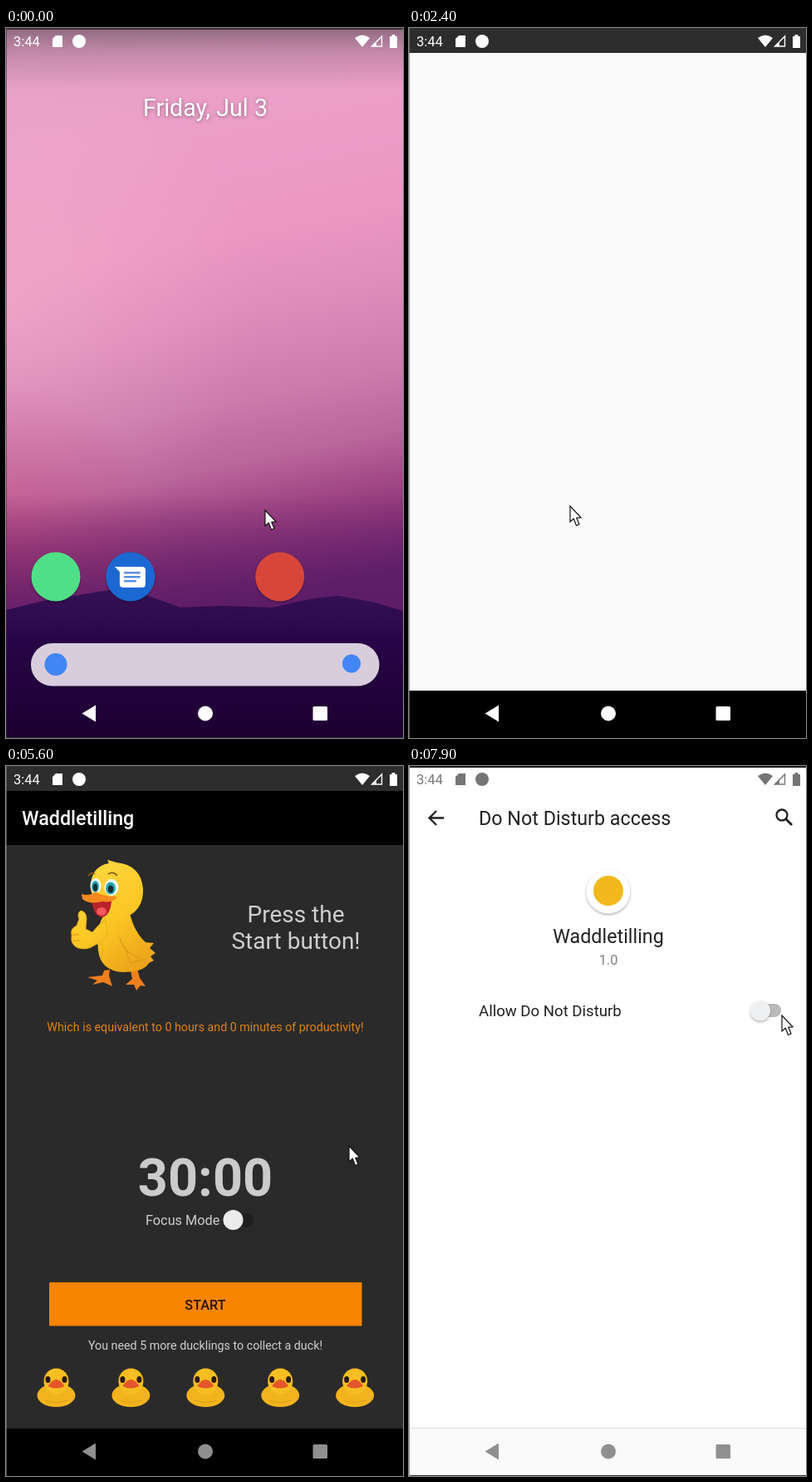
These frames come from a looping animation (478x854 px, 8 s). An HTML page with a canvas:

```html
<!DOCTYPE html>
<html lang="en">
<head>
<meta charset="utf-8">
<style>
html, body { margin: 0; width: 478px; height: 854px; overflow: hidden; background: #000; }
canvas { display: block; }
</style>
</head>
<body>
<canvas id="stage" width="478" height="854"></canvas>
<script>
const c = document.getElementById('stage').getContext('2d');
const W = 478, H = 854, LOOP = 8000, STEP = 100;
const APP = 'Waddletilling';

const clamp = v => Math.max(0, Math.min(1, v));
const lerp = (a, b, p) => a + (b - a) * p;
const smooth = p => p * p * (3 - 2 * p);
const ramp = (t, from, to) => smooth(clamp((t - from) / (to - from)));

function rect(x, y, w, h, color, r = 0) {
  c.fillStyle = color;
  c.beginPath();
  c.roundRect(x, y, w, h, r);
  c.fill();
}
function oval(x, y, rx, ry, color) {
  c.fillStyle = color;
  c.beginPath();
  c.ellipse(x, y, rx, ry, 0, 0, 7);
  c.fill();
}
const disc = (x, y, r, color) => oval(x, y, r, r, color);
function shape(d, fill, stroke, width = 1) {
  const path = new Path2D(d);
  if (fill) { c.fillStyle = fill; c.fill(path); }
  if (stroke) { c.strokeStyle = stroke; c.lineWidth = width; c.stroke(path); }
}
function text(s, x, y, size, color, align = 'left', weight = 400) {
  c.font = `${weight} ${size}px Roboto, sans-serif`;
  c.textAlign = align;
  c.fillStyle = color;
  c.fillText(s, x, y);
}
function withStops(g, stops) {
  stops.forEach(([at, color]) => g.addColorStop(at, color));
  return g;
}
const gradient = (x0, y0, x1, y1, ...stops) => withStops(c.createLinearGradient(x0, y0, x1, y1), stops);
const glow = (x, y, r, ...stops) => withStops(c.createRadialGradient(x, y, 0, x, y, r), stops);
function group(draw, alpha = 1, x = 0, y = 0) {
  if (alpha <= 0) return;
  c.save();
  c.globalAlpha *= alpha;
  c.translate(x, y);
  draw();
  c.restore();
}
function shadowed(draw, blur = 3, dy = 1.5, color = 'rgba(0,0,0,.3)') {
  c.save();
  c.shadowColor = color;
  c.shadowBlur = blur;
  c.shadowOffsetY = dy;
  draw();
  c.restore();
}

// System bars
function statusBar(color) {
  text('3:44', 9, 22, 16.5, color);
  shape('M60 9H68V23H56V13Z', color);
  disc(88, 16, 8, color);
  shape('M429 23L420 12Q429 5 438 12Z', color);
  shape('M452.5 10V22H440.5Z', null, color, 1.4);
  shape('M446 16.5V22H440.5Z', color);
  shape('M464.5 8H468.5V10H471V24H462V10H464.5Z', color);
}
function navBar(color) {
  shape('M108 814.5V834.5L91.5 824.5Z', color);
  disc(240, 824.5, 9, color);
  rect(369.5, 816, 17.5, 17, color, 1.5);
}

// Launcher icons, drawn around (0, 0)
const plate = color => shadowed(() => disc(0, 0, 29.5, color));
const plain = color => () => plate(color);
const badge = color => () => { plate('#fff'); disc(0, 0, 18, color); };
const green = plain('#4fe087');

const icons = {
  calendar() {
    plate('#fff');
    rect(-17, -19, 34, 10, '#a9b4c8', 2);
    rect(-19, -12, 38, 29, '#3f6fd0', 2);
    text('3', 0, 10, 23, '#fff', 'center');
  },
  camera() {
    plate('#4c7fdc');
    shape('M-8-17H8L11-12H17Q19-12 19-10V12Q19 14 17 14H-17Q-19 14-19 12V-10Q-19-12-17-12H-11Z', '#fff');
    disc(0, 1, 10, '#c9d6ee');
    disc(0, 1, 7, '#4080e8');
  },
  clock() {
    plate('#c8ccd6');
    disc(0, 0, 25, '#4c80dc');
    shape('M-26 2L0-1L16 6', null, '#fff', 2.5);
    disc(0, 0, 2.5, '#fff');
  },
  contacts() {
    plate('#fff');
    rect(-16, -15, 32, 31, '#0f83c4', 2);
    rect(-16, -11, 32, 22, '#20a9dd');
    disc(0, -4, 4.5, '#fff');
    shape('M-9 8Q-8 2 0 2Q8 2 9 8Z', '#fff');
  },
  files() {
    plate('#4c80dc');
    shape('M-15-15H-4L0-11H13Q15-11 15-9V12Q15 14 13 14H-13Q-15 14-15 12Z', '#e3eafb');
    shape('M-15-7H15V12Q15 14 13 14H-13Q-15 14-15 12Z', '#fff');
  },
  messages() {
    plate('#1c68d2');
    shape('M-19-12H14Q18-12 18-8V9Q18 13 14 13H-9Q-13 13-13 9V-6Z', '#fff');
    for (const y of [-5, 0, 5]) rect(-8, y - 1, y > 4 ? 15 : 20, 2.5, '#5a8fe0', 1);
  },
  phone() {
    plate('#fff');
    shape('M-15-16H-8L-5-7L-9-3Q-5 5 3 9L7 5L16 8V15Q14 17 10 16Q-12 11-16-12Z', '#149be0');
  },
  settings() {
    plate('#1f68d2');
    for (let i = 0; i < 8; i++) {
      rect(-5, -21, 10, 12, '#fff', 2);
      c.rotate(Math.PI / 4);
    }
    disc(0, 0, 16.5, '#fff');
    disc(0, 0, 8, '#1f68d2');
    disc(0, 0, 5, '#fff');
  }
};
const browser = plain('#d8463a');
const apps = [
  ['Basic UI', green], ['Calendar', icons.calendar], ['Camera', icons.camera], ['Tarvik', browser], ['Clock', icons.clock],
  ['Coba', green], ['Contacts', icons.contacts], ['Stovo', badge('#2ba25b')], ['Files', icons.files], ['FirstAppli…', green],
  ['Ombix', badge('#d5483f')], ['Zemlio', badge('#4285f4')], ['Hello World', green], ['Just Java', green], ['Trel', plain('#3fa65a')],
  ['Messages', icons.messages], ['Phone', icons.phone], ['Photos', badge('#f0b52c')], ['Vask Film…', badge('#b5203f')], ['Vask Tunes', badge('#f07a24')],
  ['PracticeS…', green], ['Waddletill…', badge('#f2b81c')], ['Settings', icons.settings], ['Tutorial1', green], ['Tutorial2', green],
  ['Clipono', badge('#e3131c')]
];
const column = i => 60 + 89.9 * i;

// Home screen and app drawer
function wallpaper() {
  rect(0, 0, W, H, gradient(239, 0, 374, 673, [0, '#e6a0c6'], [.15, '#ec9fc8'], [.36, '#eb98c3'],
    [.5, '#df8dbb'], [.65, '#cb7bac'], [.76, '#b9669c'], [.84, '#a14885'], [.91, '#8a3479'], [1, '#66246f']));
  rect(0, 0, W, H, glow(0, 330, 300, [0, 'rgba(255,195,215,.3)'], [1, 'rgba(255,195,215,0)']));
  rect(0, 0, W, H, glow(0, 625, 200, [0, 'rgba(200,60,115,.4)'], [1, 'rgba(200,60,115,0)']));
  rect(0, 560, W, 160, gradient(0, 560, 0, 700, [0, 'rgba(90,25,100,0)'], [1, 'rgba(90,25,100,.75)']));
  rect(0, 0, W, 75, gradient(0, 0, 0, 75, [0, 'rgba(70,60,70,.55)'], [.4, 'rgba(90,70,85,.25)'], [1, 'rgba(90,70,85,0)']));
  shape('M0 700L45 689L100 680L130 675L160 679L210 697L260 695L320 697L370 686L400 683L440 690L478 701V854H0Z',
    gradient(0, 680, 0, H, [0, '#351055'], [.35, '#280447'], [1, '#1c0030']));
}
function searchBar(y, p) {
  const tint = [lerp(216, 252, p), lerp(205, 249, p), lerp(221, 251, p)];
  shadowed(() => rect(30, y - 25.5, 419.5, 51.5, `rgb(${tint})`, 25.7), 4, 1.5, 'rgba(0,0,0,.18)');
  disc(60, y, 13.5, '#4285f4');
  disc(416, y - 1, 11, '#4285f4');
}
function launcher(t) {
  const p = ramp(t, 500, 1250), shift = 675 * (1 - p);
  const settled = t >= 1500;
  wallpaper();
  group(() => shadowed(() => text('Friday, Jul 3', 240, 106, 28.6, '#fff', 'center'), 4, 1, 'rgba(0,0,0,.4)'), 1 - 2 * p);
  group(() => rect(0, 2 + shift, W, H, gradient(0, 0, 0, H, [0, '#fefafd'], [.35, '#fbf4f9'], [.75, '#f3eef4'], [.85, '#ebeaee'], [1, '#ececf0']), 14),
    clamp(p * 1.6));
  for (const [i, icon] of [[0, green], [1, icons.messages], [3, browser]])
    group(icon, 1 - 3 * p, column(i), 660 - 675 * p);
  group(() => apps.forEach(([name, icon], i) => {
    const x = column(i % 5), y = 172 + 112 * Math.floor(i / 5);
    group(icon, 1, x, y);
    text(name, x, y + 56, 14.2, '#77747a', 'center');
  }), clamp((p - .3) * 2), 0, shift);
  searchBar(90.5 + shift, p);
  group(() => rect(0, 812, W, 42, '#f1f0f3'), clamp(p * 2 - 1));
  statusBar(settled ? '#757575' : '#fff');
  navBar(settled ? '#909090' : '#fff');
  rect(0, 0, W, 2, '#3d3039');
  rect(0, 853, W, 1, '#2a2430');
  rect(0, 0, 1, H, 'rgba(60,50,60,.6)');
}

// Focus timer app
function mascot() {
  const skin = gradient(85, 115, 180, 250, [0, '#fedb45'], [.5, '#fcc724'], [1, '#e79a18']);
  shape('M118 246L116 252L98 254L110 258L104 263L117 260L128 265L124 252L125 245ZM150 246L152 256L144 263L154 263L157 270L162 264L168 265L161 255L158 244Z', '#ee7f1e');
  shape('M119 178Q108 192 111 222Q114 246 140 248Q166 248 172 237L178 234L174 229L180 225L173 219L178 213L168 212Q159 204 153 190L148 175Z', skin);
  shape('M120 184Q112 190 104 200L96 196L97 184Q97 175 90 174Q85 177 88 184L85 192Q77 195 79 204Q77 215 87 219Q98 222 106 216Q116 212 122 202Z', skin, '#e2a51c', .7);
  shape('M80 203H88M80 210H89', null, '#d99618');
  shape('M102 148Q101 121 124 117L122 113L133 116Q162 119 165 147Q166 172 146 181Q118 187 108 171Z', skin);
  shape('M137 206Q140 224 160 230M142 216L150 237L168 232', null, '#dc9d19', 1.5);
  oval(108, 144, 6.5, 9, '#fff');
  oval(127, 146, 8.5, 10, '#fff');
  oval(107.5, 145, 4.5, 7, '#25a5ad');
  oval(126, 147, 6, 7.5, '#25a5ad');
  oval(107.5, 146, 2.5, 4.5, '#102a30');
  oval(126, 148, 3.2, 4.5, '#102a30');
  shape('M99 132Q103 127 107 130M123 130Q129 126 134 132', null, '#8a5a12', 1.6);
  shape('M103 163L127 162Q126 179 116 182Q106 181 103 163Z', '#b8222c');
  oval(115, 175, 6, 5, '#f0585a');
  shape('M91 154Q101 157 108 151Q116 157 134 157Q130 165 116 163Q100 167 92 160Z', '#f58b1f');
}
function duckling() {
  oval(0, 9, 23, 14, '#f2b41d');
  oval(0, -8, 15, 15.5, '#f7be22');
  oval(-10, -10, 3, 4, '#2b1a10');
  oval(10, -10, 3, 4, '#2b1a10');
  shape('M-10-2Q-5-10 0-10Q5-10 10-2Q0 3-10-2Z', '#e4572a');
  shape('M-13 15Q0 20 13 15', null, '#dc9d19');
}
function timerApp(t) {
  const dim = ramp(t, 2900, 3100) * (1 - ramp(t, 5400, 5600));
  rect(0, 30, W, 767, '#2a2a2a');
  rect(0, 30, W, 65, '#000');
  text(APP, 19, 71, 23.3, '#fff', 'left', 500);
  mascot();
  text('Press the', 349, 188, 28, '#cfcfcf', 'center');
  text('Start button!', 349, 220, 28, '#cfcfcf', 'center');
  text('Which is equivalent to 0 hours and 0 minutes of productivity!', 240, 319, 14.28, '#e08217', 'center');
  text('30:00', 240, 517, 63, '#cbcbcb', 'center', 700);
  text('Focus Mode', 168, 552, 16.3, '#cfcfcf');
  rect(262, 538, 36, 16, '#202020', 8);
  disc(273.5, 546, 12, '#ececec');
  rect(52, 621, 376.5, 52.5, '#f88400', 1);
  text('START', 240, 653.5, 16.3, '#241300', 'center', 500);
  text('You need 5 more ducklings to collect a duck!', 240, 702, 14.28, '#cfcfcf', 'center');
  for (let i = 0; i < 5; i++) group(duckling, 1, column(i) + .5, 748);
  rect(0, 30, W, 767, `rgba(0,0,0,${.36 * dim})`);
  group(() => {
    shadowed(() => rect(31, 346, 418.5, 134, '#eeeef0', 2), 8, 3, 'rgba(0,0,0,.4)');
    text(`You are required to allow ${APP} app`, 59, 387, 18.6, '#222');
    text('to access the do not disturb settings.', 59, 409, 18.6, '#222');
    text('OK', 398, 453.5, 16.3, '#e08a1e', 'center', 500);
  }, dim);
}
function appWindow(t) {
  const open = ramp(t, 2000, 2300);
  c.save();
  c.globalAlpha = clamp(open * 3);
  c.beginPath();
  c.roundRect(lerp(121, 0, open), lerp(591, 0, open), lerp(58, W, open), lerp(58, H, open), 29 * (1 - open));
  c.clip();
  rect(0, 0, W, H, '#fafafa');
  rect(0, 0, W, 30, '#2d2d2d');
  statusBar('#fff');
  if (t >= 2800) timerApp(t);
  rect(0, 797, W, 57, '#000');
  navBar(t < 3000 ? '#fff' : '#8f8f8f');
  rect(0, 0, 1, H, 'rgba(130,130,130,.6)');
  c.restore();
}

// Settings
function settingsPage(t) {
  const listed = t >= 6500, detail = ramp(t, 7250, 7600);
  rect(0, 0, W, H, '#fff');
  statusBar('#757575');
  text('Do Not Disturb access', listed ? 84 : 19, 71, 23.3, '#212121');
  if (listed) {
    shape('M42 62.5H25M33 54L24.5 62.5L33 71', null, '#212121', 2.3);
    c.beginPath();
    c.arc(449, 59, 6.5, 0, 7);
    c.stroke();
    shape('M453.5 63.5L461 71', null, '#212121', 2.8);
  }
  group(() => {
    shadowed(() => disc(240, 151, 26.5, '#fff'));
    disc(240, 150, 18, '#f2b81c');
    text(APP, 240, 213, 23.3, '#212121', 'center');
    text('1.0', 240, 239, 16.3, '#808080', 'center');
    text('Allow Do Not Disturb', 84, 301, 18.6, '#212121');
    rect(415, 286, 33, 16, '#b9b9b9', 8);
    shadowed(() => disc(423, 294.5, 12, '#eff0f1'));
  }, detail);
  rect(0, 797, W, 57, '#fafafa');
  rect(0, 796, W, 1, '#dedede');
  navBar('#909090');
  rect(0, 0, W, 2, '#1c1c1c');
  rect(0, 853, W, 1, '#333');
  rect(0, 0, 1, H, '#a8a8a8');
}

// Pointer stops: time, x, y
const stops = [
  [100, 312, 580], [450, 238, 690], [550, 236, 690], [1150, 226, 78], [1350, 226, 78], [1850, 156, 620], [2100, 156, 620],
  [2400, 194, 575], [3000, 228, 598], [4600, 228, 598], [5300, 404, 449], [5500, 413, 457], [5700, 413, 457],
  [6000, 395, 463], [6400, 395, 463], [6800, 250, 150], [7300, 250, 150], [7800, 449, 300], [LOOP, 449, 300]
];
function pointer(t) {
  const i = Math.max(1, stops.findIndex(s => s[0] >= t));
  const [t0, x0, y0] = stops[i - 1], [t1, x1, y1] = stops[i];
  const p = ramp(t, t0, t1);
  group(() => shape('M0 0V19L4.3 15.2L7.5 23.5L11 22L7.8 14.3L13 13.8Z', '#fff', '#111', 1.2), 1, lerp(x0, x1, p), lerp(y0, y1, p));
}

function draw(t) {
  if (t < 2300) launcher(t);
  if (t >= 2000) appWindow(t);
  const enter = ramp(t, 5600, 5950);
  if (enter > 0) group(() => settingsPage(t), clamp(enter * 2), 0, 60 * (1 - enter));
  pointer(t);
}
function tick() {
  draw(Math.floor(performance.now() % LOOP / STEP) * STEP);
  requestAnimationFrame(tick);
}
tick();
</script>
</body>
</html>
```
